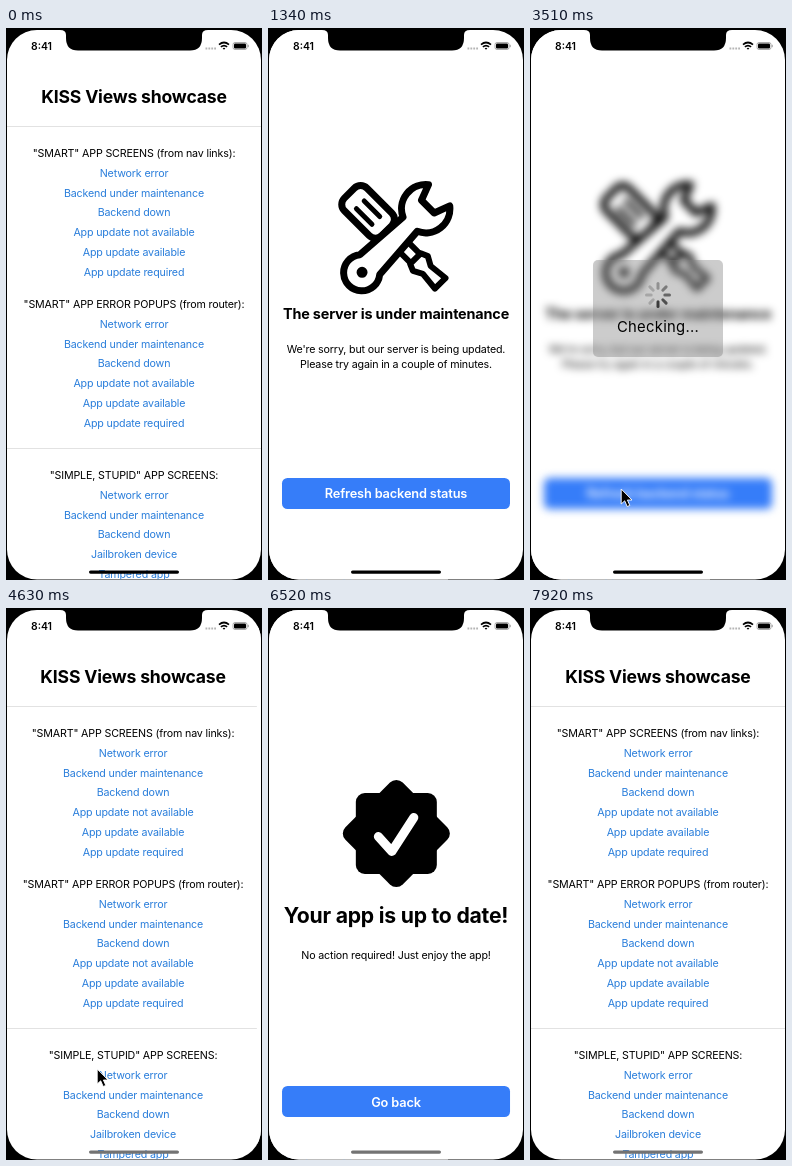
An HTML page for the animation above (7.99 s loop, 256 px wide and 552 px high).

```html
<!DOCTYPE html>
<html lang="en">
<head>
<meta charset="utf-8">
<title>Views showcase</title>
<style>
  html, body { margin: 0; width: 100%; height: 100%; overflow: hidden; background: #000; }
  svg { display: block; width: 100vw; height: 100vh; }
  text { font-family: Inter, "Open Sans", sans-serif; text-anchor: middle; }
  .body { font-size: 10.7px; letter-spacing: -.015em; }
  .link { fill: #2a7edb; }
  .bold { font-weight: 700; letter-spacing: -.011em; }
  .label { font-size: 12.8px; font-weight: 600; letter-spacing: -.013em; fill: #fff; }
  .button { fill: #367df9; }
  .tool { fill: #fff; stroke: #000; stroke-width: 7; stroke-linejoin: round; stroke-linecap: round; }
</style>
</head>
<body>
<svg viewBox="0 0 256 552">
  <defs>
    <clipPath id="screen"><rect x="1" y="2" width="254" height="549.5" rx="30"/></clipPath>
  </defs>

  <g clip-path="url(#screen)">
    <g id="list">
      <rect width="256" height="552" fill="#fff"/>
      <text class="bold" x="128" y="75" font-size="17.6">KISS Views showcase</text>
      <path d="M0 98.5H256M0 420.5H256" stroke="#e2e2e2"/>
    </g>
    <rect id="dim" width="256" height="552"/>

    <g id="maintenance">
      <rect width="256" height="552" fill="#fff"/>
      <g id="content">
        <g class="tool" transform="translate(128 209) rotate(45)">
          <rect x="0" y="-5" width="34" height="13" stroke-width="6"/>
          <path d="M29 -6L36 -9L45 -4L64 -6V9L45 7L36 12L29 9Z" stroke-width="6"/>
          <rect x="-64" y="-14" width="53" height="32" rx="9"/>
          <path d="M-48 8H-26M-48 -3H-26" stroke-width="5"/>
        </g>
        <g class="tool" transform="translate(128 209) rotate(-45)">
          <path d="M60 16A24.2 24.2 0 0 1 19 11L-38 15A18.1 18.1 0 1 1 -38 -13L19 -9A24.2 24.2 0 0 1 60 -14L44 -8V10Z"/>
          <circle cx="-49" cy="1" r="5.5" fill="#000" stroke="none"/>
        </g>
        <text class="bold" x="128" y="291" font-size="14.4">The server is under maintenance</text>
        <text class="body" x="128" y="325">We're sorry, but our server is being updated.</text>
        <text class="body" x="128" y="339.5">Please try again in a couple of minutes.</text>
        <rect class="button" x="14" y="450" width="228" height="31" rx="5.5"/>
        <text class="label" x="128" y="470">Refresh backend status</text>
      </g>
      <g id="hud">
        <rect x="63" y="232" width="130" height="97" rx="5" fill="#808080" fill-opacity=".4"/>
        <g id="spinner" stroke="#222" stroke-width="3" stroke-linecap="round"></g>
        <text x="128" y="304" font-size="14.8" letter-spacing=".3">Checking...</text>
      </g>
    </g>

    <g id="updated">
      <rect width="256" height="552" fill="#fff"/>
      <g transform="translate(128.3 225.5)">
        <rect x="-40.5" y="-40.5" width="81" height="81" rx="9"/>
        <rect x="-40.5" y="-40.5" width="81" height="81" rx="9" transform="rotate(45)"/>
        <path d="M-18 3L-4.5 18L17.5 -16" fill="none" stroke="#fff" stroke-width="9" stroke-linecap="round" stroke-linejoin="round"/>
      </g>
      <text class="bold" x="128" y="314.5" font-size="21.2">Your app is up to date!</text>
      <text class="body" x="128" y="351">No action required! Just enjoy the app!</text>
      <rect class="button" x="14" y="478" width="228" height="31" rx="5.5"/>
      <text class="label" x="128" y="498.5">Go back</text>
    </g>

    <rect id="home" x="83" y="542.5" width="90" height="3.2" rx="1.6"/>
  </g>

  <!-- notch and status bar -->
  <path d="M54 0V2Q60 2 60 7V10Q60 22.5 72 22.5H184Q196 22.5 196 10V7Q196 2 202 2V0Z"/>
  <text x="35.5" y="22" font-size="10.4" font-weight="600">8:41</text>
  <path d="M199.5 20.5H210" stroke="#b5b5b5" stroke-width="1.8" stroke-dasharray="1.8 1.1"/>
  <g fill="none" stroke="#000" stroke-width="1.7">
    <path d="M213 16.6Q218 12.4 223 16.6M214.9 18.9Q218 16.2 221.1 18.9"/>
    <path d="M216.6 20.2L218 21.8L219.4 20.2Q218 19.2 216.6 20.2Z" fill="#000" stroke="none"/>
  </g>
  <rect x="227" y="14.5" width="14" height="7" rx="2" fill="none" stroke="#999" stroke-width=".8"/>
  <rect x="228" y="15.5" width="12" height="5" rx="1.1"/>
  <path d="M242.2 16.8V19.2" stroke="#999"/>

  <circle id="tap" r="13.2" fill="#c4c4c4" fill-opacity=".78" stroke="#a2a2a2" stroke-opacity=".85"/>
  <path id="cursor" d="M0 0V15L3.5 11.8L6 17.5L8.6 16.4L6.2 11H10.8Z" stroke="#fff" stroke-width=".9"/>
</svg>

<script>
const LOOP = 7990, TICK = 70;
const PUSH_1 = 500, CHECK = 1970, POP_1 = 4280, PUSH_2 = 5890, POP_2 = 7360;
const $ = id => document.getElementById(id);

function add(parent, tag, attrs, text = '') {
  const el = document.createElementNS('http://www.w3.org/2000/svg', tag);
  for (const key in attrs) el.setAttribute(key, attrs[key]);
  el.textContent = text;
  return parent.appendChild(el);
}

const smartLinks = ['Network error', 'Backend under maintenance', 'Backend down',
  'App update not available', 'App update available', 'App update required'];
const simpleLinks = [...smartLinks.slice(0, 3), 'Jailbroken device', 'Tampered app'];

function section(y, heading, links) {
  [heading, ...links].forEach((label, i) => add($('list'), 'text',
    { class: i ? 'body link' : 'body', x: 128, y: y + i * 19.75 }, label));
}
section(129, '"SMART" APP SCREENS (from nav links):', smartLinks);
section(280, '"SMART" APP ERROR POPUPS (from router):', smartLinks);
section(451, '"SIMPLE, STUPID" APP SCREENS:', simpleLinks);

const spokes = Array.from({ length: 8 }, (_, i) => add($('spinner'), 'path',
  { d: 'M0 -6.8V-11.5', transform: `translate(128 267) rotate(${i * 45})` }));

// [from, until, x, y]
const taps = [[500, 570, 126.5, 166], [1900, 2040, 91, 462],
  [5820, 5960, 126.3, 208.5], [7290, 7430, 121.5, 500]];
const cursors = [[570, 1340, 126.7, 166], [2040, 4980, 91.2, 461]];

function spring(ms) {
  const x = Math.max(0, ms) * .01826;
  return 1 - (1 + x) * Math.exp(-x);
}

function ramp(t, start, length) {
  const x = Math.min(1, Math.max(0, (t - start) / length));
  return x * x * (3 - 2 * x);
}

function show(el, visible) { el.style.display = visible ? '' : 'none'; }
function move(el, x, y = 0) { el.setAttribute('transform', `translate(${x} ${y})`); }

function placeMark(el, spans, t) {
  const span = spans.find(([from, until]) => t >= from && t < until);
  show(el, span);
  if (span) move(el, span[2], span[3]);
}

function placePage(el, amount) {
  show(el, amount > .001);
  move(el, 254 * (1 - amount));
}

function render(t) {
  const first = spring(t - PUSH_1) - spring(t - POP_1);
  const second = spring(t - PUSH_2) - spring(t - POP_2);
  const covered = first + second;
  placePage($('maintenance'), first);
  placePage($('updated'), second);
  move($('list'), -76 * covered);
  $('dim').setAttribute('opacity', .1 * covered);

  const busy = ramp(t, CHECK, 350) - ramp(t, POP_1, 300);
  $('content').style.filter = busy > 0 ? `blur(${4.5 * busy}px)` : 'none';
  $('hud').setAttribute('opacity', busy);
  const head = (t - 3510) / 125 + 4;
  spokes.forEach((spoke, i) => {
    const age = (((head - i) % 8) + 8) % 8;
    spoke.setAttribute('opacity', .22 + .63 * Math.max(0, 1 - age / 5));
  });

  const grey = 115 * ramp(t, POP_1, 300);
  $('home').setAttribute('fill', `rgb(${grey},${grey},${grey})`);
  placeMark($('tap'), taps, t);
  placeMark($('cursor'), cursors, t);
}

function frame() {
  const t = performance.now() % LOOP;
  render(Math.max(0, Math.floor((t - 10) / TICK) * TICK + 10));
  requestAnimationFrame(frame);
}
frame();
</script>
</body>
</html>
```
